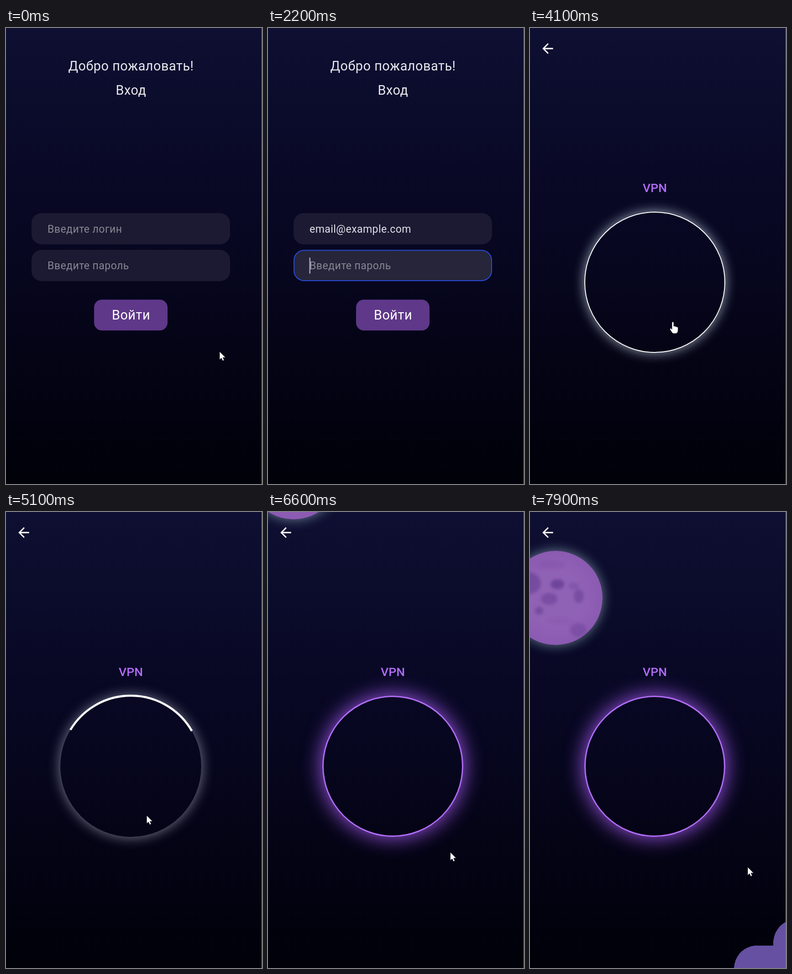
These frames come from a looping animation (561 px wide and 998 px high, 8 s). An HTML page:

```html
<!DOCTYPE html>
<html lang="ru">
<head>
<meta charset="utf-8">
<title>VPN</title>
<style>
  html, body { margin: 0; width: 561px; height: 998px; overflow: hidden; background: #010109; }
  #stage {
    position: relative; width: 561px; height: 998px; overflow: hidden;
    background: linear-gradient(#0f0f33 0%, #0b0b2b 18%, #090927 31%, #06061e 55%, #050416 70%, #020210 85%, #010109 100%);
  }
  #stage > * { position: absolute; box-sizing: border-box; }
  .layer { left: 0; top: 0; }
  #moon {
    left: -47px; top: -103px; width: 206px; height: 206px; border-radius: 50%; overflow: hidden;
    background: radial-gradient(#9062b5 0 40%, #8a59b1 75%, #7c46a7 100%);
    box-shadow: 0 0 26px rgba(185, 220, 225, .55);
  }
  #ring {
    left: 119px; top: 402px; width: 309px; height: 309px; border-radius: 50%;
    border: 2.5px solid #fff; box-shadow: 0 0 26px rgba(205, 220, 235, .72);
  }
  #ring.busy { border-color: transparent; box-shadow: 0 0 28px rgba(185, 190, 210, .66); }
  #ring.on { border: 3.5px solid #b06cf6; box-shadow: 0 0 43px 3px rgba(168, 92, 245, .85); }
  text { font-family: Roboto, "Open Sans", sans-serif; letter-spacing: .02em; fill: #e8e8f0; }
  .big { font-size: 28.75px; text-anchor: middle; }
  .entry { font-size: 23px; }
  .vpn { font-size: 26.5px; font-weight: 500; letter-spacing: 0; text-anchor: middle; fill: #b06cf6; }
</style>
</head>
<body>
<div id="stage">
  <div id="moon">
    <svg width="206" height="206" viewBox="-103 -103 206 206">
      <defs><filter id="soft" x="-30%" y="-30%" width="160%" height="160%"><feGaussianBlur stdDeviation="3"/></filter></defs>
      <g id="craters" fill="#643b91" filter="url(#soft)"></g>
    </svg>
  </div>

  <div id="ring"></div>

  <svg class="layer" width="561" height="998">
    <g id="login">
      <text class="big" x="274" y="92.5">Добро пожаловать!</text>
      <text class="big" x="274" y="145.5">Вход</text>
      <g id="fields"></g>
      <rect id="button" x="193" y="594.5" width="161" height="67.5" rx="17"/>
      <text class="big" x="274" y="638" style="fill:#fff">Войти</text>
    </g>
    <g id="home">
      <path transform="translate(21.2 27.4) scale(1.47)" fill="#fff"
        d="M20 11H7.83l5.59-5.59L12 4l-8 8 8 8 1.41-1.41L7.83 13H20z"/>
      <text class="vpn" x="273.5" y="358.5">VPN</text>
      <path id="arc" fill="none" stroke="#fff" stroke-width="4.6"/>
    </g>
    <path id="cloud" fill="#6550a2" shape-rendering="crispEdges"
      d="M447 1000A50 51 0 0 1 497 949H533V944A54 54 0 0 1 587 890H760V1000Z"/>
    <g id="cursor" fill="#fff" stroke="#08081a" stroke-width=".8" stroke-linejoin="round">
      <path data-kind="arrow" d="M0 0V18.2L4 14.6 6.9 20.5 10 19 7.3 13.2H13Z"/>
      <path data-kind="hand" d="M0 0q2 0 2 2v8l1-1q2 0 2 1.5 2-1.3 3.2.8 3-.8 3.2 2v5q0 7.500-6.500 7.500H2Q0 25.800-1.500 24L-6 17q-1-2 .6-2.600 1.200-.4 2.400 1L-2 16.500V2Q-2 0 0 0Z"/>
      <path data-kind="beam" d="M-4-10H-1L0-9 1-10H4V-8.500H1V8.500H4V10H1L0 9-1 10H-4V8.500H-1V-8.500H-4Z"/>
    </g>
    <rect x="560" width="1" height="998" fill="#77778c"/>
  </svg>
</div>

<script>
const $ = id => document.getElementById(id);
const LOOP = 8000, STEP = 100;
const CX = 273.5, CY = 556.5, R = 154.5;

const OPEN = 3800;      // login screen gives way to the home screen
const CONNECT = 4600;
const CONNECTED = 6400;

// Pointer path: time, x, y of the tip
const PATH = [
  [0, 468, 708], [100, 468, 708], [500, 310, 446], [1600, 310, 446], [1900, 305, 522],
  [2800, 305, 522], [3100, 371, 637], [3400, 318, 641], [3800, 318, 641], [4100, 313, 643],
  [4600, 311, 650], [5200, 308, 665], [6000, 308, 665], [6300, 322, 710], [6900, 477, 779],
  [7100, 477, 779], [7900, 477, 777]
];

const FIELDS = [
  { y: 405, hint: 'Введите логин', text: 'email@example.com', focus: 600, blur: 2000, start: 700, rate: 46.6 },
  { y: 485.5, hint: 'Введите пароль', text: 'password123', focus: 2000, blur: OPEN, start: 2150, rate: 65 }
];

// Dark patches: x, y, rx, ry, opacity
const CRATERS = [
  [-62, -32, 30, 24, .6], [-14, 2, 18, 13, .5], [4, -30, 15, 11, .75], [51, -4, 11, 15, .55],
  [50, 70, 18, 15, .4], [-36, 28, 9, 9, .6], [40, -26, 12, 7, .35], [-80, 10, 14, 30, .3],
  [10, 50, 28, 8, .12], [-10, -72, 30, 9, .15]
];

const NS = 'http://www.w3.org/2000/svg';
function add(parent, tag, attrs) {
  const el = document.createElementNS(NS, tag);
  set(el, attrs);
  return parent.appendChild(el);
}
function set(el, attrs) {
  for (const k in attrs) el.setAttribute(k, attrs[k]);
}
const show = (el, on) => { el.style.display = on ? '' : 'none'; };
const clamp = v => Math.max(0, Math.min(1, v));
const easeOut = u => 1 - (1 - u) ** 2;
const smooth = u => u * u * (3 - 2 * u);

for (const [cx, cy, rx, ry, opacity] of CRATERS)
  add($('craters'), 'ellipse', { cx, cy, rx, ry, opacity });

for (const f of FIELDS) {
  f.box = add($('fields'), 'rect', { 'stroke-width': 2, rx: 22 });
  f.label = add($('fields'), 'text', { class: 'entry', x: 91, y: f.y + 42.5 });
  f.caret = add($('fields'), 'rect', { y: f.y + 17, width: 2.5, height: 35, fill: '#a6a6c6' });
}

function pointer(t) {
  const i = PATH.findIndex(p => p[0] > t);
  if (i < 0) return PATH[PATH.length - 1].slice(1);
  const [t0, x0, y0] = PATH[i - 1], [t1, x1, y1] = PATH[i];
  const u = smooth((t - t0) / (t1 - t0));
  return [x0 + (x1 - x0) * u, y0 + (y1 - y0) * u];
}

const inside = ([x, y], l, t, r, b) => x > l && x < r && y > t && y < b;

function drawField(f, t, mouse) {
  const focused = t >= f.focus && t < f.blur;
  const count = Math.max(0, Math.min(f.text.length, Math.floor((t - f.start) / f.rate)));
  const hover = inside(mouse, 56, f.y, 491, f.y + 68.5);
  const inset = focused ? 1 : 0;
  set(f.box, {
    x: 56 + inset, y: f.y + inset, width: 435 - 2 * inset, height: 68.5 - 2 * inset,
    fill: hover ? '#26253a' : '#1b1a32', stroke: focused ? '#294bd6' : 'none'
  });
  f.label.textContent = count ? f.text.slice(0, count) : f.hint;
  f.label.style.fill = count ? '#e0e0ea' : '#868692';
  show(f.caret, focused);
  if (focused) f.caret.setAttribute('x', 91 + (count ? f.label.getComputedTextLength() : 0) - .5);
  return hover;
}

function drawCursor(t, [x, y], kind) {
  const typing = FIELDS.some(f => t >= f.start && t < f.start + f.text.length * f.rate + 50);
  show($('cursor'), !typing);
  $('cursor').setAttribute('transform', `translate(${x} ${y})`);
  for (const p of $('cursor').children) show(p, p.dataset.kind === kind);
}

function drawArc(t) {
  const point = deg => {
    const a = deg * Math.PI / 180;
    return `${CX + R * Math.cos(a)} ${CY + R * Math.sin(a)}`;
  };
  const from = 175 + (t - 6000) * .36;
  $('arc').setAttribute('d', `M${point(from)}A${R} ${R} 0 0 1 ${point(from + 119)}`);
}

function draw(t) {
  const home = t >= OPEN, busy = t >= CONNECT && t < CONNECTED, on = t >= CONNECTED;
  const mouse = pointer(t);
  let kind = 'arrow';

  show($('login'), !home);
  show($('home'), home);
  show($('ring'), home);
  show($('arc'), busy);
  show($('moon'), on);

  if (!home) {
    for (const f of FIELDS) if (drawField(f, t, mouse)) kind = 'beam';
    const hover = inside(mouse, 193, 594, 354, 662);
    $('button').setAttribute('fill', hover ? '#6e439c' : '#5f3889');
    if (hover) kind = 'hand';
  } else {
    $('ring').className = busy ? 'busy' : on ? 'on' : '';
    if (!busy && Math.hypot(mouse[0] - CX, mouse[1] - CY) < R) kind = 'hand';
    drawArc(t);
  }

  const y = -120 + 338.5 * easeOut(clamp((t - 6500) / 2000));
  $('moon').style.transform = `translateY(${y}px)`;
  $('craters').setAttribute('transform', `rotate(${(y - 188) * .667})`);

  show($('cloud'), t > 7400);
  $('cloud').setAttribute('transform', `translate(${114 * (1 - easeOut(clamp((t - 7400) / 500)))} 0)`);

  drawCursor(t, mouse, kind);
}

const begin = performance.now();
function tick() {
  const t = (performance.now() - begin) % LOOP;
  draw(Math.floor(t / STEP) * STEP);
  requestAnimationFrame(tick);
}
tick();
</script>
</body>
</html>
```
